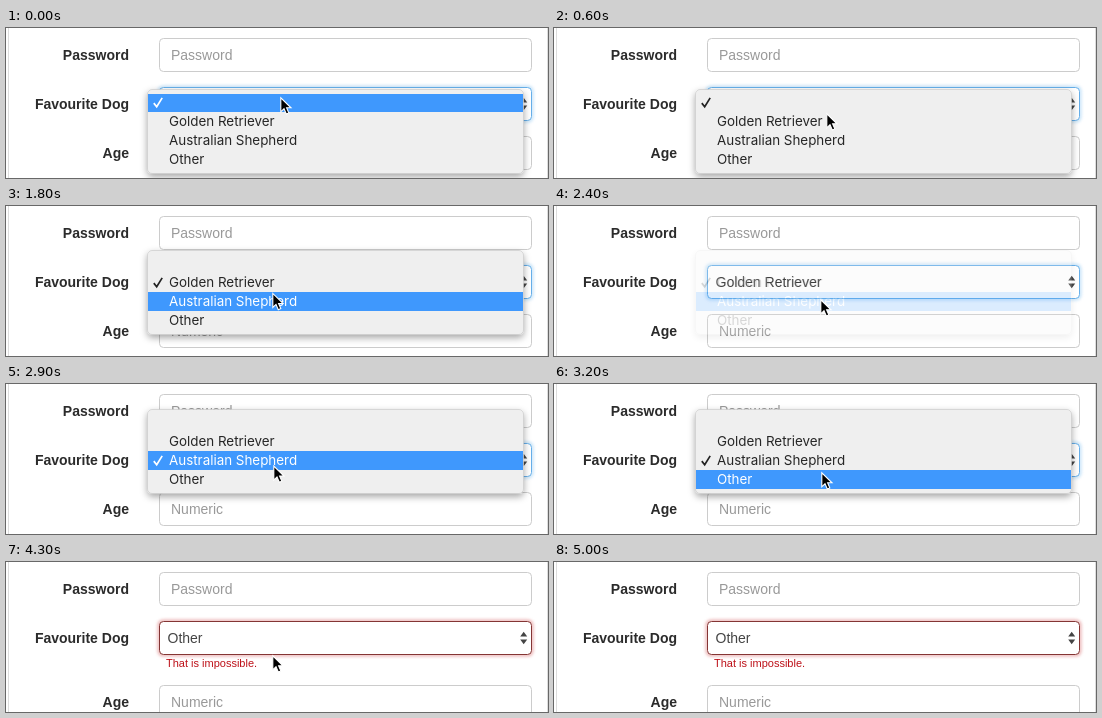
These frames come from a looping animation (542 by 150 pixels, 5300 ms). An HTML page:

```html
<!DOCTYPE html>
<html lang="en">
<head>
<meta charset="utf-8">
<title>Form with dropdown</title>
<style>
html, body { margin: 0; width: 100%; height: 100%; overflow: hidden; background: #fff; }
svg { display: block; width: 542px; height: 150px; }
text { font: 14px "Liberation Sans", Arial, sans-serif; fill: #444; }
.label { font-weight: bold; fill: #2b2b2b; text-anchor: end; }
.hint { fill: #999; }
.error { font-size: 11px; fill: #bd1018; }
.item { font: 13.4px Inter, Roboto, sans-serif; fill: #262626; }
.field { fill: #fff; stroke: #ccc; }
</style>
</head>
<body>
<svg viewBox="0 0 542 150">
  <defs>
    <filter id="shadow" x="-10%" y="-20%" width="120%" height="150%">
      <feDropShadow dx="0" dy="3" stdDeviation="3.5" flood-color="#000" flood-opacity=".35"/>
    </filter>
    <filter id="blur" x="-5%" y="-30%" width="110%" height="160%">
      <feGaussianBlur stdDeviation="1.6"/>
    </filter>
  </defs>
  <path d="M2.5 0V150M541.5 0V150" stroke="#ddd"/>

  <text class="label" x="123" y="32">Password</text>
  <rect class="field" x="153.5" y="10.5" width="372" height="33" rx="4"/>
  <text class="hint" x="165" y="32">Password</text>

  <g id="age">
    <text class="label" x="123" y="130">Age</text>
    <rect class="field" x="153.5" y="108.5" width="372" height="33" rx="4"/>
    <text class="hint" x="165" y="130">Numeric</text>
  </g>

  <text class="label" x="123" y="81">Favourite Dog</text>
  <rect id="glow" x="153" y="59" width="373" height="34" rx="4" fill="none" stroke-width="3" filter="url(#blur)" opacity=".5"/>
  <rect id="select" class="field" x="153.5" y="59.5" width="372" height="33" rx="4"/>
  <text id="value" x="161.5" y="81"></text>
  <path d="M514.2 74.6L517.7 69.8L521.2 74.6ZM514.2 77.4L517.7 82.2L521.2 77.4Z" fill="#444"/>
  <text id="error" class="error" x="160" y="105">That is impossible.</text>

  <g id="menu">
    <rect x="141.5" y="0" width="376" height="84" rx="4.5" fill="#efefef" stroke="#c4c4c4" stroke-width=".6" filter="url(#shadow)"/>
    <rect id="bar" x="142" width="375" fill="#3f98fd"/>
    <path id="check" d="M-4.2 .6L-1.3 4.2L4.2 -4.6" fill="none" stroke-width="1.7"/>
  </g>

  <path id="cursor" d="M.8 .8V14.8L4 11.8L6.3 17L8.8 15.9L6.6 10.8H11Z" fill="#000" stroke="#fff" stroke-width="1.1"/>
</svg>
<script>
const LOOP = 5300, STEP = 100;
const items = ["", "Golden Retriever", "Australian Shepherd", "Other"];

// Each menu: top edge, checked row, opening time, time of the selection blink
const menus = [
  { top: 61.5, checked: 0, open: 0, pick: 600 },
  { top: 44.5, checked: 1, open: 1500, pick: 2100 },
  { top: 25.5, checked: 2, open: 2700, pick: 3500 }
];
const fade = [1, 1, 0.6, 0.18];
const FADE_TIME = fade.length * STEP;

// Pointer path: time, x, y
const path = [
  [0, 274, 69], [300, 273, 89], [400, 273, 91], [600, 272, 85],
  [1100, 272, 85], [1300, 266, 75], [1500, 266, 75], [2000, 266, 93],
  [2500, 266, 93], [2600, 267, 84], [2800, 267, 80], [3200, 267, 88],
  [3400, 266, 93], [4400, 266, 93], [5000, 100, 152]
];

const $ = id => document.getElementById(id);
const set = (el, attrs) => {
  for (const k in attrs) el.setAttribute(k, attrs[k]);
};
const rowTop = k => k ? 3.5 + 19 * k : 4.5;

const rows = items.map((name, k) => {
  const el = document.createElementNS("http://www.w3.org/2000/svg", "text");
  set(el, { class: "item", x: 163, y: 17.5 + 19 * k });
  el.textContent = name;
  return $("menu").appendChild(el);
});

function pointer(t) {
  const i = path.findIndex(p => p[0] > t);
  if (i < 0) return path[path.length - 1].slice(1);
  const [a, b] = [path[i - 1], path[i]];
  const u = (t - a[0]) / (b[0] - a[0]);
  const e = u * u * (3 - 2 * u);
  return [a[1] + (b[1] - a[1]) * e, a[2] + (b[2] - a[2]) * e];
}

function drawMenu(t, y) {
  const m = menus.find(m => t >= m.open && t < m.pick + FADE_TIME);
  set($("menu"), { visibility: m ? "visible" : "hidden" });
  if (!m) return;

  const phase = Math.floor((t - m.pick) / STEP);
  const hover = Math.max(0, Math.min(3, Math.floor((y - m.top - 3.5) / 19)));
  const lit = phase === 0 ? -1 : hover;
  set($("menu"), {
    transform: `translate(0 ${m.top})`,
    opacity: phase < 0 ? 1 : fade[phase]
  });
  set($("bar"), {
    y: rowTop(hover),
    height: hover ? 19 : 18,
    opacity: lit < 0 ? 0 : 1
  });
  set($("check"), {
    transform: `translate(152 ${13 + 19 * m.checked})`,
    stroke: lit === m.checked ? "#fff" : "#222"
  });
  rows.forEach((row, k) => { row.style.fill = k === lit ? "#fff" : ""; });
}

function draw(t) {
  const [x, y] = pointer(t);
  const chosen = menus.filter(m => t >= m.pick + FADE_TIME).length;
  const failed = chosen === 3;

  $("value").textContent = items[chosen];
  $("select").style.stroke = failed ? "#843534" : "#66afe9";
  set($("glow"), { stroke: failed ? "#d8696a" : "#8cc6f2" });
  set($("error"), { visibility: failed ? "visible" : "hidden" });
  set($("age"), { transform: `translate(0 ${failed ? 15 : 0})` });
  drawMenu(t, y);
  set($("cursor"), { transform: `translate(${x} ${y})` });
}

const start = performance.now();
function tick() {
  const t = (performance.now() - start) % LOOP;
  draw(Math.floor(t / STEP) * STEP);
  requestAnimationFrame(tick);
}
tick();
</script>
</body>
</html>
```
